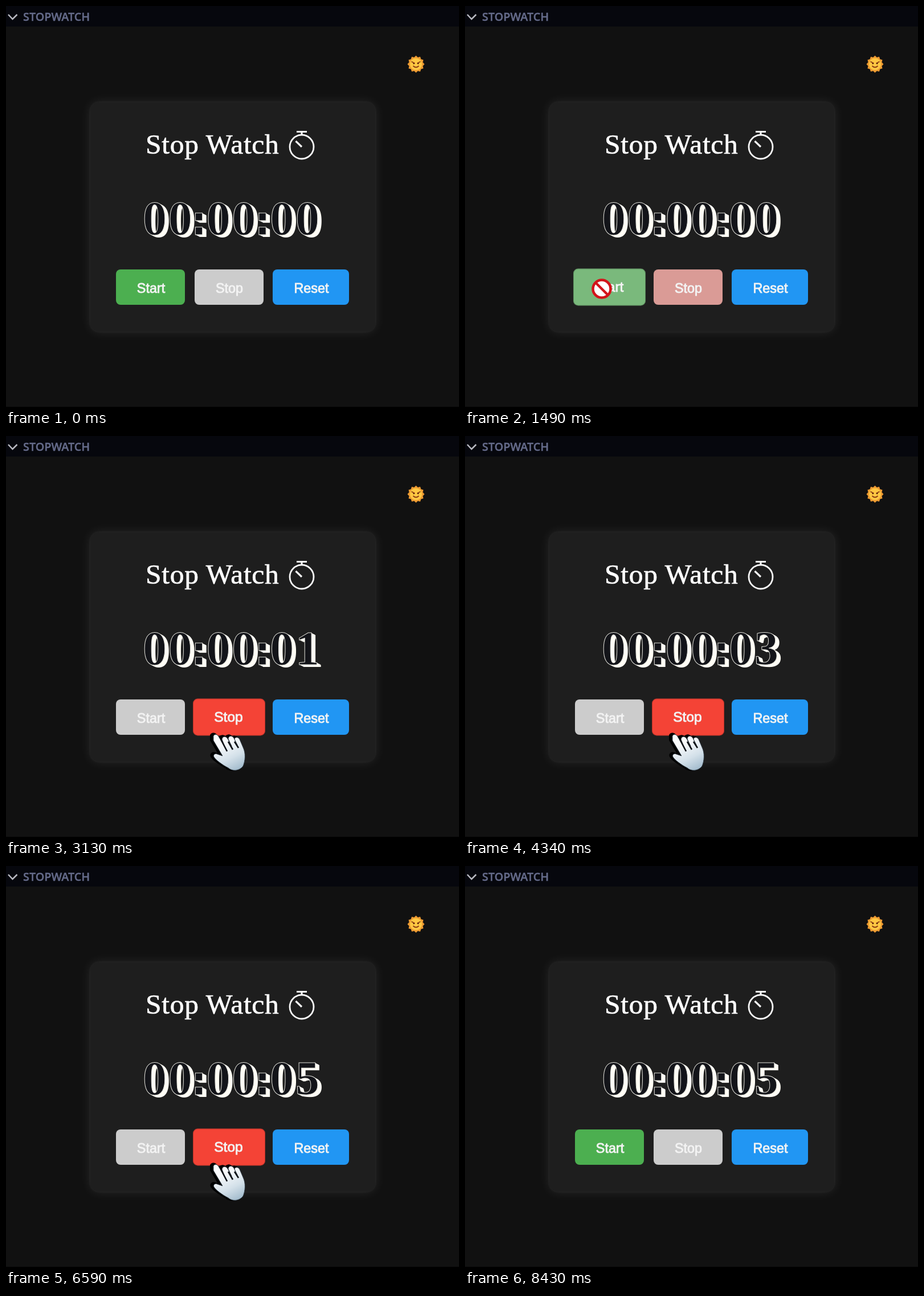
Write an HTML page that moves like this. It is 795x705 px and loops after 8.59 s.

```html
<!DOCTYPE html>
<html lang="en">
<head>
<meta charset="utf-8">
<title>Stopwatch</title>
<style>
  html, body { margin: 0; width: 100%; height: 100%; overflow: hidden; background: #111; }
  body > * { position: absolute; white-space: nowrap; }
  header { left: 0; top: 0; width: 795px; height: 36px; background: #06070d; }
  header span {
    position: absolute; left: 30px; top: 5px;
    font: 600 19.8px/27px "Open Sans", sans-serif; color: #656b8a; -webkit-text-stroke: .4px #656b8a;
  }
  footer { left: 0; top: 703px; width: 795px; height: 2px; background: #000; }
  .card {
    left: 148px; top: 169px; width: 500px; height: 402px; border-radius: 15px;
    background: #1e1e1e; box-shadow: 0 0 4px rgba(255, 255, 255, .08), 0 0 20px rgba(255, 255, 255, .1);
  }
  h1 {
    left: 245px; top: 213px; margin: 0; color: #fff; letter-spacing: .7px;
    font: 400 49.5px/60px "Liberation Serif", serif; -webkit-text-stroke: .7px #fff;
  }
  .time {
    left: 240px; top: 372.6px; color: #131419;
    font: 700 84px/0 "Liberation Serif", serif;
    -webkit-text-stroke: 1px #e4e3dc;
    text-shadow: 1px .5px #fffdf5, 2px 1px #fffdf5, 3px 1.5px #fffdf5, 4px 2px #fffdf5,
      5px 2.5px #fffdf5, 6px 3px #fffdf5, 7px 3.5px #fffdf5;
  }
  .time span { display: inline-block; width: 44.7px; }
  .time .colon { width: 22.3px; text-indent: -5px; font: 700 70px/0 "DejaVu Sans", sans-serif; }
  .button {
    top: 462px; width: 121px; height: 62px; border-radius: 8px;
    display: flex; align-items: center; justify-content: center;
    font: 23.4px "Liberation Sans", sans-serif; color: #f3f3f3; -webkit-text-stroke: .9px #f3f3f3;
  }
  svg { left: 0; top: 0; }
</style>
</head>
<body>
<header><span>STOPWATCH</span></header>
<footer></footer>
<div class="card"></div>
<h1>Stop Watch</h1>
<div class="time"></div>
<div class="button" id="start" style="left:193px"><span>Start</span></div>
<div class="button" id="stop" style="left:330.5px"><span>Stop</span></div>
<div class="button" id="reset" style="left:468px;width:134px;background:#2196f3"><span>Reset</span></div>

<svg width="795" height="705" fill="none">
  <defs>
    <linearGradient id="skin" x1=".3" y1="0" x2=".75" y2="1">
      <stop offset=".2" stop-color="#fbfcfd"/>
      <stop offset=".65" stop-color="#d3e0e9"/>
      <stop offset="1" stop-color="#a3bccd"/>
    </linearGradient>
    <path id="glove" d="M2 4C4 0 9 1 11 5L23 25 17 10C18 4 24 4 27 9L34 22 28 9C29 3 35 3 38 8L44 20 39 10C40 5 46 6 48 10L54 24C59 34 58 48 54 57C48 65 36 67 28 60C18 55 6 46 3 41C1 37 5 34 9 36L18 39 2 12Z"/>
  </defs>
  <path d="M4 15l7.500 8 8-8" stroke="#b9bac2" stroke-width="2.500"/>
  <g stroke="#f6f6f6" stroke-width="2.800">
    <circle cx="519" cy="247" r="21"/>
    <path d="M510 220.500h18M519 220v6M508.500 237l10.500 10" stroke-width="3.200"/>
  </g>
  <g transform="translate(719.5 102)">
    <path id="rays" fill="#ec9a32"/>
    <circle r="10.500" fill="#ffc843"/>
    <path d="M-8-4.500l6 3M8-4.500l-6 3M-5 3q5 5 10 0" stroke="#8a3b12" stroke-width="1.800"/>
    <path d="M-5-1h2.500M2.500-1h2.500" stroke="#5c260c" stroke-width="2"/>
  </g>
  <g id="cursor">
    <g id="hand" transform="translate(6 2)">
      <use href="#glove" x="-4" y="-1" fill="#000" stroke="#000" stroke-width="4"/>
      <use href="#glove" fill="url(#skin)" stroke="#26323b" stroke-width=".8"/>
      <path d="M15 10l11 21M28 14l8 14M39 14l7 11" stroke="#0c1116" stroke-width="2.600"/>
    </g>
    <g id="denied" stroke="#d2141a" stroke-width="4.500">
      <circle r="15.500" fill="#fff"/>
      <path d="M-11-11L11 11"/>
    </g>
  </g>
</svg>

<script>
const LOOP = 8590;
const $ = selector => document.querySelector(selector);
const GREEN = [76, 175, 80], GRAY = [204, 204, 204], RED = [244, 67, 54];
const TICKS = [2350, 3340, 4220, 5180, 6390];
// time, x, y of the pointer
const PATH = [
  [250, 150, 720], [1010, 240, 496], [2050, 240, 496], [2430, 339, 520],
  [2460, 339, 520], [2800, 356, 520], [7750, 356, 520], [8150, 340, 725]
];

const ramp = (t, from, to) => {
  const p = Math.min(1, Math.max(0, (t - from) / (to - from)));
  return p * p * (3 - 2 * p);
};
const mix = (a, b, p) => `rgb(${a.map((v, i) => v + (b[i] - v) * p)})`;

function pointer(t) {
  const i = Math.max(1, PATH.findIndex(k => k[0] > t));
  if (t >= PATH.at(-1)[0]) return PATH.at(-1).slice(1);
  const [t0, x0, y0] = PATH[i - 1], [t1, x1, y1] = PATH[i];
  const p = ramp(t, t0, t1);
  return [x0 + (x1 - x0) * p, y0 + (y1 - y0) * p];
}

function drawButton(id, color, hover) {
  const button = $(id);
  button.style.background = color;
  button.style.transform = `scale(${1 + .05 * hover})`;
  button.style.boxShadow = `inset 0 0 0 1px rgba(0,0,0,${.25 * hover})`;
  button.firstChild.style.transform = `translate(${1 - 2 * hover}px,${2 - 2 * hover}px)`;
}

let shown;
function drawTime(text) {
  if (text === shown) return;
  shown = text;
  $('.time').innerHTML = [...text].map(c => `<span${c === ':' ? ' class="colon"' : ''}>${c}</span>`).join('');
}

function draw(now) {
  const t = now % LOOP;
  const running = ramp(t, 1390, 1640) - ramp(t, 6960, 7110);
  drawTime('00:00:0' + TICKS.filter(tick => t >= tick).length);
  drawButton('#start', mix(GREEN, GRAY, running), ramp(t, 900, 1150) - ramp(t, 2320, 2540));
  drawButton('#stop', mix(GRAY, RED, running), ramp(t, 2350, 2600) - ramp(t, 7820, 8070));

  const denied = t >= 1390 && t < 2320 || t >= 6990 && t < 7820;
  $('#cursor').setAttribute('transform', `translate(${pointer(t)})`);
  $('#hand').style.display = denied ? 'none' : '';
  $('#denied').style.display = denied ? '' : 'none';
  requestAnimationFrame(draw);
}

const rays = Array.from({ length: 24 }, (_, i) => {
  const angle = i * Math.PI / 12, r = i % 2 ? 12.5 : 15;
  return [r * Math.cos(angle), r * Math.sin(angle)];
});
$('#rays').setAttribute('d', `M${rays.join('L')}Z`);
drawButton('#reset', '#2196f3', 0);
requestAnimationFrame(draw);
</script>
</body>
</html>
```
